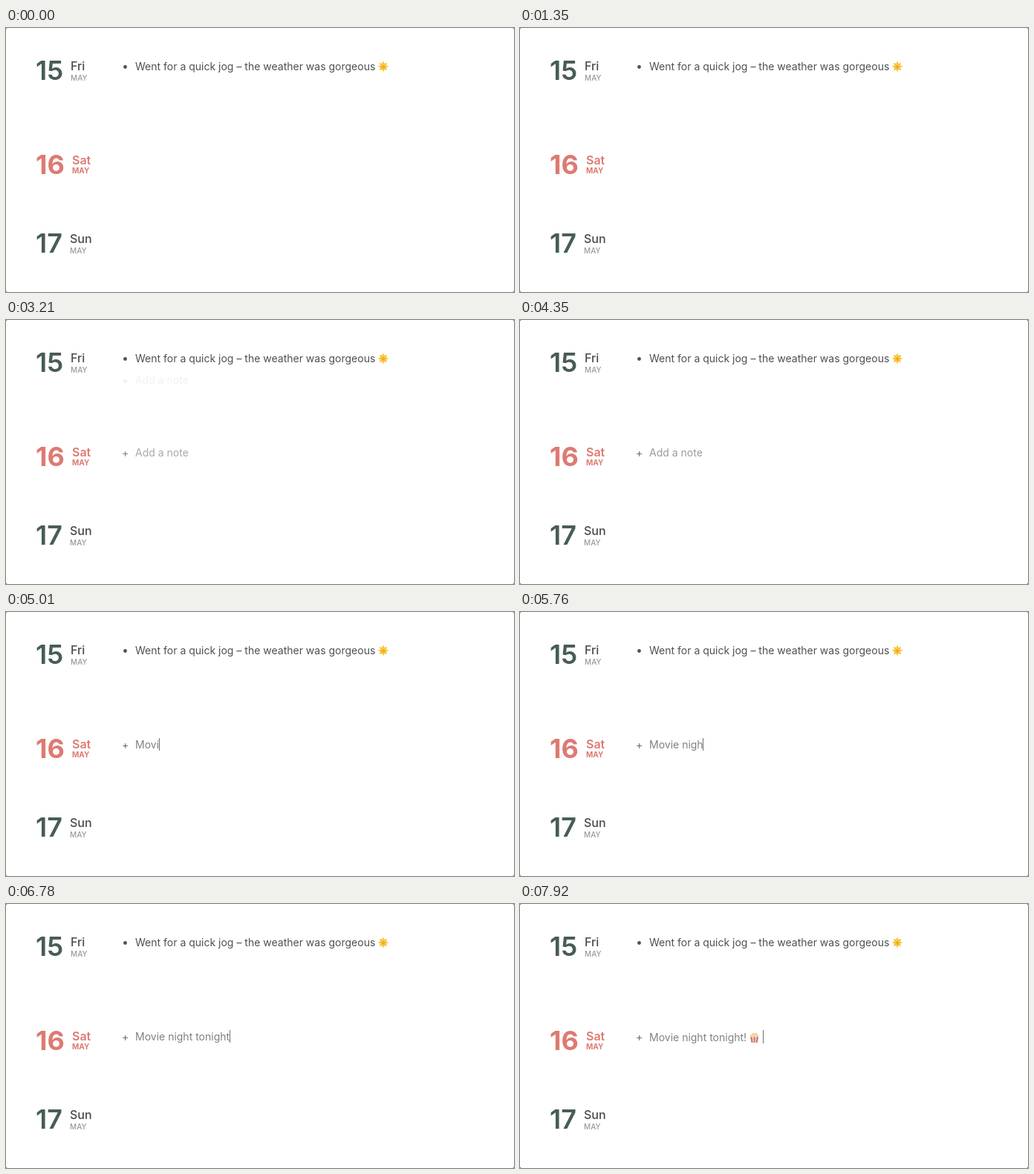
These frames come from a looping animation (684 by 356 pixels, 8000 ms). An HTML page:

```html
<!DOCTYPE html>
<html lang="en">
<head>
<meta charset="utf-8">
<title>Journal</title>
<style>
  html, body { margin: 0; width: 100%; height: 100%; overflow: hidden; background: #444; }
  svg { display: block; width: 684px; height: 356px; }
  text { font-family: Inter, sans-serif; white-space: pre; }
  .num { font-size: 36px; font-weight: 600; fill: #475c57; }
  .day { font-size: 16px; font-weight: 500; fill: #4a4a4a; }
  .mon { font-size: 10px; font-weight: 500; fill: #999; }
  .today text { fill: #dd7a72; font-weight: 700; }
  .today .day { font-weight: 600; }
  .body { font-size: 14px; fill: #4d5151; }
  .hint { font-size: 14px; fill: #9a9a9a; }
  .plus { font-size: 14px; fill: #6c6c6c; }
  .typed { font-size: 14px; fill: #808080; }
</style>
</head>
<body>
<svg viewBox="0 0 684 356">
  <rect width="684" height="356" rx="2" fill="#fff"/>

  <g>
    <text class="num" x="40" y="70">15</text>
    <text class="day" x="87" y="57">Fri</text>
    <text class="mon" x="87" y="71">MAY</text>
  </g>
  <g class="today">
    <text class="num" x="40" y="197">16</text>
    <text class="day" x="89" y="184">Sat</text>
    <text class="mon" x="89" y="196">MAY</text>
  </g>
  <g>
    <text class="num" x="40" y="303">17</text>
    <text class="day" x="86" y="290">Sun</text>
    <text class="mon" x="86" y="304">MAY</text>
  </g>

  <circle cx="160.5" cy="52.5" r="2.4" fill="#4d5151"/>
  <text class="body" x="174" y="57">Went for a quick jog – the weather was gorgeous</text>
  <g transform="translate(508 52)">
    <path id="rays" fill="#f6bd2f"/>
    <circle r="4.3" fill="#fbd04a"/>
    <circle r="2.6" cy=".4" fill="#f3ae2c"/>
  </g>

  <g id="friNote">
    <text class="plus" x="156" y="86">+</text>
    <text class="hint" x="174" y="86">Add a note</text>
  </g>
  <g id="satNote">
    <text class="plus" x="156" y="184">+</text>
    <text class="hint" id="hint" x="174" y="184">Add a note</text>
    <text class="typed" id="typed" x="174" y="184"></text>
    <g id="popcorn">
      <path d="M1 6h11l-1.6 8h-7.8z" fill="#efd9d4"/>
      <path d="M1 6h2.4l1 8h-1.8zM5.4 6h2.2l-.3 8h-1.6zM9.6 6h2.4l-1.6 8h-1.8z" fill="#cf706c"/>
      <g fill="#efd5a6">
        <circle cx="2.8" cy="4.8" r="2"/>
        <circle cx="10.2" cy="4.8" r="2"/>
        <circle cx="5" cy="2.8" r="2"/>
        <circle cx="8.2" cy="2.6" r="2"/>
        <circle cx="6.5" cy="4.8" r="2"/>
      </g>
    </g>
    <rect id="caret" y="170" width="1" height="17" fill="#707070"/>
  </g>
</svg>

<script>
const LOOP = 8000;
const LEFT = 174;
const TEXT = 'Movie night tonight! ';
const KEYS = [4440, 4620, 4740, 4950, 5100, 5250, 5400, 5520, 5640, 5760,
  5850, 6000, 6150, 6240, 6360, 6450, 6570, 6660, 6780, 7140, 7260];
const EMOJI_AT = 7920;
const FOCUS_AT = 3660;
const BLINK = 230;

const $ = id => document.getElementById(id);
const [friNote, satNote, hint, typed, popcorn, caret] =
  ['friNote', 'satNote', 'hint', 'typed', 'popcorn', 'caret'].map($);
const pen = document.createElement('canvas').getContext('2d');

const ramp = (t, from, to) => Math.min(1, Math.max(0, (t - from) / (to - from)));
const show = (el, on) => el.setAttribute('visibility', on ? 'visible' : 'hidden');

function textWidth(s) {
  pen.font = '14px Inter, sans-serif';
  return pen.measureText(s).width;
}

function starPath(points, outer, inner) {
  const corners = Array.from({ length: points * 2 }, (_, i) => {
    const r = i % 2 ? inner : outer;
    const a = i * Math.PI / points;
    return (r * Math.sin(a)).toFixed(2) + ' ' + (-r * Math.cos(a)).toFixed(2);
  });
  return 'M' + corners.join('L') + 'Z';
}

function caretOn(t) {
  if (t < FOCUS_AT) return false;
  if (t >= KEYS[0]) return true;
  return Math.floor((t - FOCUS_AT + 10) / BLINK) % 2 === 0;
}

function draw(t) {
  const swap = ramp(t, 3030, 3240);
  friNote.setAttribute('opacity', ramp(t, 2130, 2310) * (1 - swap));
  satNote.setAttribute('opacity', swap);

  const value = TEXT.slice(0, KEYS.filter(k => k <= t).length);
  const end = LEFT + textWidth(value);
  const emoji = t >= EMOJI_AT;

  typed.textContent = value;
  typed.setAttribute('y', emoji ? 185 : 184);
  show(hint, !value);
  show(popcorn, emoji);
  popcorn.setAttribute('transform', `translate(${end} 173)`);
  show(caret, caretOn(t));
  caret.setAttribute('x', Math.floor(end + (emoji ? 18 : 0)));
  caret.setAttribute('height', emoji ? 18 : 17);
}

$('rays').setAttribute('d', starPath(8, 7.2, 4.2));

const start = performance.now();
function tick() {
  draw((performance.now() - start) % LOOP);
  requestAnimationFrame(tick);
}
tick();
</script>
</body>
</html>
```
